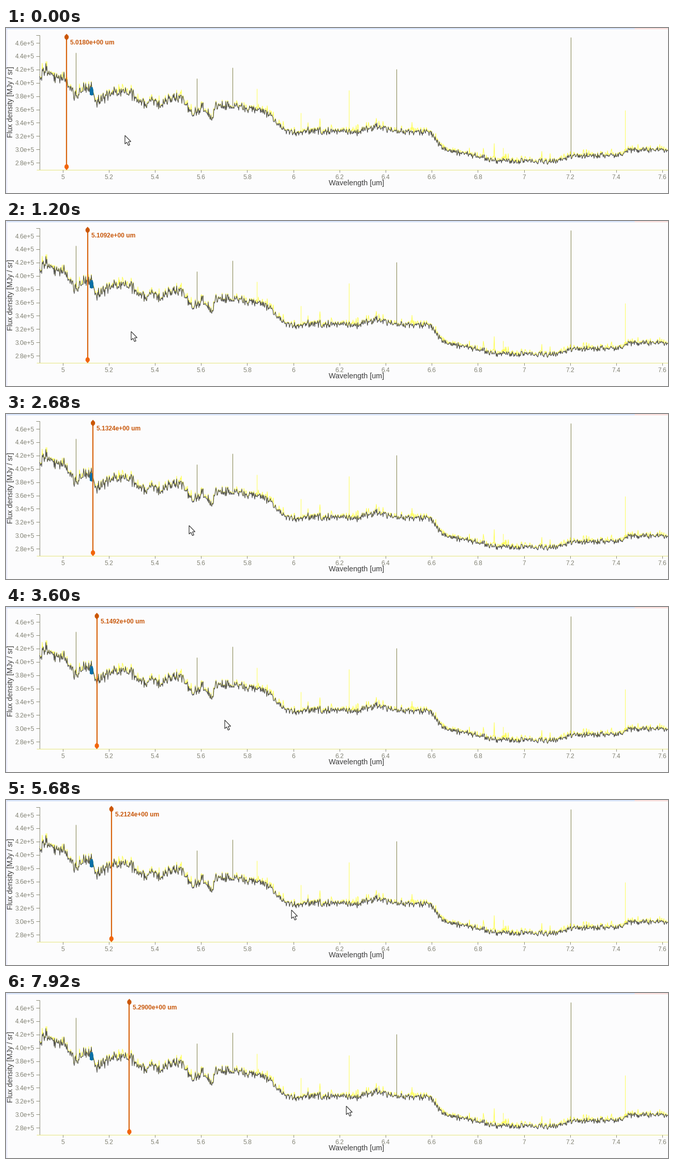
A matplotlib script that plays this animation: 1280x321 px, repeating every 8000 ms.

```python
import numpy as np
import matplotlib.pyplot as plt
from matplotlib.animation import FuncAnimation
from matplotlib.patches import Polygon

W, H, DPI = 1280, 321, 100
STEP, FRAMES = 40, 200
X0, PX_PER_UM = 109.6, 446.0
SLICE = 0.0008

GRAY, YELLOW, OLIVE = "#505050", "#ffff58", "#80804a"
AXIS, TICK_TEXT, TITLE = "#8b8b78", "#828274", "#3c3c3c"
ORANGE, BLUE = "#d8640e", "#0a6fa6"

plt.rcParams["font.family"] = "Liberation Sans"


def pt(px):
    return px * 72 / DPI


def wave_x(wave):
    return X0 + (wave - 5) * PX_PER_UM


fig = plt.figure(figsize=(W / DPI, H / DPI), dpi=DPI, facecolor="#fcfcfd")
ax = fig.add_axes([0, 0, 1, 1])
ax.set_xlim(0, W)
ax.set_ylim(H, 0)
ax.axis("off")


def line(xs, ys, color, width=1.0, **kw):
    return ax.plot(xs, ys, color=color, lw=pt(width),
                   solid_capstyle="butt", **kw)[0]


def label(x, y, text, px, color, **kw):
    kw = {"ha": "center", "va": "center_baseline", **kw}
    return ax.text(x, y, text, fontsize=pt(px), color=color, **kw)


def shape(points, color, **kw):
    return ax.add_patch(Polygon(points, fc=color, **{"ec": "none", **kw}))


# ---- spectrum: a coarse trend plus seeded noise that fades to the right ----
TREND = [(65, 94), (80, 80), (95, 101), (105, 94), (124, 108), (132, 138),
         (148, 118), (165, 118), (174, 143), (205, 127), (236, 124),
         (272, 152), (280, 136), (301, 152), (320, 134), (342, 137),
         (360, 168), (380, 154), (400, 178), (405, 151), (449, 153),
         (500, 162), (535, 196), (560, 205), (580, 199), (680, 203),
         (715, 191), (745, 200), (820, 203), (845, 236), (950, 258),
         (1060, 260), (1090, 249), (1188, 247), (1205, 238), (1280, 237)]


def trend(x):
    return np.interp(x, *zip(*TREND))


rng = np.random.default_rng(12)
xs = np.arange(65, W + 1, 1.0)
sigma = 2.4 + 5 * np.exp(-(xs - 65) / 420)
flux = trend(xs) + sigma * np.clip(rng.normal(size=xs.size), -2, 2)
upper = flux - 1.6 * rng.exponential(size=xs.size) ** 1.4 - 0.8

line(xs, upper, YELLOW, 1.1, zorder=2)
line(xs, flux, GRAY, 1.15, zorder=3)

YELLOW_PEAKS = [(484, 118), (569, 165), (662, 121), (960, 233), (1196, 160)]
DARK_PEAKS = [(134, 48), (368, 98), (437, 77), (754, 80), (1091, 18)]
for peaks, color in ((YELLOW_PEAKS, YELLOW), (DARK_PEAKS, OLIVE)):
    for x, top in peaks:
        line([x + 0.5] * 2, [top, trend(x)], color, zorder=2.5)

shape([(162, 130), (162, 119), (164, 115), (167.5, 115),
       (169, 121), (169, 130), (166, 131.5)], BLUE, zorder=4)

# ---- axes and borders ----
line([58, 65, 65], [13.5, 13.5, 275.5], AXIS)
line([59, W], [275.5, 275.5], "#e6e67c")

for i in range(10):
    y = 29 + 25.9 * i
    line([58, 65], [y, y], AXIS)
    label(55, y, f"{4.6 - 0.2 * i:.1f}e+5", 12, TICK_TEXT, ha="right")
for i in range(14):
    wave = 5 + 0.2 * i
    x = wave_x(wave)
    line([x, x], [276, 281], AXIS)
    label(x, 289.5, f"{wave:.1f}".removesuffix(".0"), 12, TICK_TEXT)

label(677.5, 300.5, "Wavelength [um]", 14.25, TITLE)
label(9, 144, "Flux density [MJy / sr]", 14.25, TITLE,
      rotation=90, va="center")

line([0, W], [0.5, 0.5], "#a9c6f5")
line([1215, W], [0.5, 0.5], "#f3b9b4")
line([0.5, 0.5], [0, H], "#d5d8f6")
line([1279.5, 1279.5], [10, 50], "#b9b95a")

# ---- slice marker ----
DIAMOND = np.array([(0, -6.5), (4, -2), (4, 2), (0, 6.5), (-4, 2), (-4, -2)])
stem = line([0, 0], [18, 270], ORANGE, 2.2, zorder=5)
knobs = [(shape(DIAMOND, color, zorder=6), y)
         for color, y in (("#cb5604", 17.7), ("#f2650a", 270))]
readout = label(0, 31.7, "", 12, "#c9590d", weight="bold",
                ha="left", va="baseline", zorder=6)

# ---- mouse pointer ----
ARROW = np.array([(0, 0), (0, 16.5), (3.7, 13.2), (6.4, 19.5),
                  (9.2, 18.3), (6.6, 12.2), (11.5, 12)])
pointer = shape(ARROW, "white", ec="#303030", lw=pt(1.2),
                joinstyle="miter", zorder=8)

# ---- motion: steady between key times, except for short pauses (ms) ----
PAUSES = [(600, 840), (960, 1200), (2440, 2600), (6400, 6600)]
KEYS = np.array([  # ms, wavelength, pointer x, pointer y
    (0, 5.0180, 229.5, 209), (1200, 5.1092, 242.5, 215),
    (2680, 5.1324, 354.5, 217), (4520, 5.1668, 492, 222),
    (5680, 5.2124, 552, 214), (6760, 5.2628, 579.5, 212),
    (7920, 5.2900, 658, 220)])


def active(ms):
    """Time spent moving up to the given moment."""
    return ms - sum(np.clip(ms - a, 0, b - a - STEP) for a, b in PAUSES)


def pose(ms):
    now, keys = active(ms), active(KEYS[:, 0])
    return [np.interp(now, keys, KEYS[:, c]) for c in (1, 2, 3)]


def draw(i):
    wave, px, py = pose(i * STEP)
    start = KEYS[0, 1]
    wave = start + SLICE * round((wave - start) / SLICE)
    x = wave_x(wave) - 0.5
    stem.set_xdata([x, x])
    for knob, y in knobs:
        knob.set_xy(DIAMOND + (x, y))
    readout.set_x(x + 7)
    readout.set_text(f"{wave:.4e} um")
    pointer.set_xy(ARROW + (round(px), round(py)))
    return [stem, readout, pointer] + [knob for knob, _ in knobs]


anim = FuncAnimation(fig, draw, frames=FRAMES, interval=STEP,
                     init_func=lambda: draw(0), repeat=True, repeat_delay=0)
plt.show()
```
